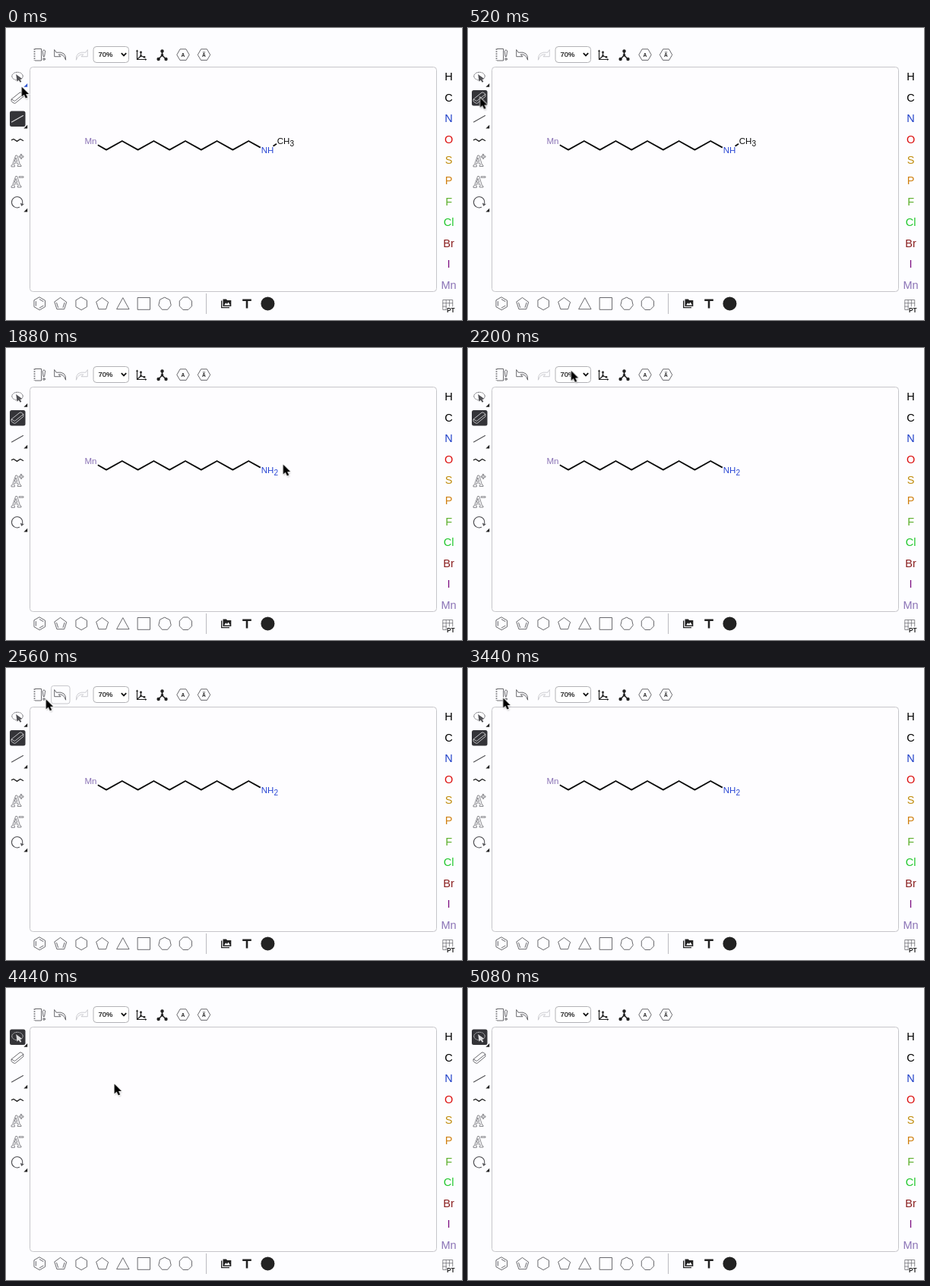
These frames come from a looping animation (600 px wide and 385 px high, 5520 ms). An HTML page:

```html
<!DOCTYPE html>
<html lang="en">
<head>
<meta charset="utf-8">
<title>Molecule editor</title>
<style>
html, body { margin: 0; width: 100%; height: 100%; overflow: hidden; background: #fdfdff; }
svg { display: block; width: 100vw; height: 100vh; font-family: "Liberation Sans", Arial, sans-serif; }
.line { fill: none; stroke: currentColor; stroke-width: .85; stroke-linejoin: round; stroke-linecap: round; }
.icons { color: #505054; }
.faint { color: #77777b; }
.solid { fill: #222; }
.on { color: #dcdcde; }
.on rect { fill: #343438; }
.hover { fill: none; stroke: #c8c8cc; }
.atom { font-size: 11.5px; }
.sub { font-size: 10px; }

.on, .hover, #mol, #methyl, #amine, #blue { animation: 5520ms step-end infinite; }
#mol { animation-name: mol; }
#methyl { animation-name: methyl; }
#amine { animation-name: amine; }
#bondOn { animation-name: bondOn; }
#eraserOn { animation-name: eraserOn; }
#lassoOn { animation-name: lassoOn; }
#eraserHover { animation-name: eraserHover; }
#undoHover { animation-name: undoHover; }
#clearHover { animation-name: clearHover; }
#blue { animation-name: blue; }
#cursor { animation: move 5520ms ease-in-out infinite, gone 5520ms step-end infinite; }

@keyframes mol { 0% { visibility: visible } 64.49%, 100% { visibility: hidden } }
@keyframes methyl { 0% { visibility: inherit } 23.91%, 100% { visibility: hidden } }
@keyframes amine { 0% { visibility: hidden } 23.91%, 100% { visibility: inherit } }
@keyframes bondOn { 0% { visibility: visible } 7.25%, 100% { visibility: hidden } }
@keyframes eraserOn { 0% { visibility: hidden } 7.25% { visibility: visible } 64.49%, 100% { visibility: hidden } }
@keyframes lassoOn { 0% { visibility: hidden } 64.49%, 100% { visibility: visible } }
@keyframes eraserHover { 0% { visibility: hidden } 4.35% { visibility: visible } 7.25%, 100% { visibility: hidden } }
@keyframes undoHover { 0% { visibility: hidden } 44.2% { visibility: visible } 47.1%, 100% { visibility: hidden } }
@keyframes clearHover {
  0% { visibility: hidden } 47.1% { visibility: visible }
  62.32% { visibility: hidden } 64.49% { visibility: visible }
  76.81%, 100% { visibility: hidden }
}
@keyframes blue { 0% { fill: #2f55d0 } 4.35%, 100% { fill: #222 } }
@keyframes gone { 0% { visibility: visible } 86.23%, 100% { visibility: hidden } }
@keyframes move {
  0%, 2.17% { transform: translate(20.7px, 77.5px) }
  6.52% { transform: translate(15px, 90px) }
  10.14% { transform: translate(16px, 92px) }
  15.94%, 23.91% { transform: translate(371.7px, 151.5px) }
  31.88%, 34.78% { transform: translate(364.7px, 153.5px) }
  42.03% { transform: translate(84px, 2px) }
  44.2% { transform: translate(71px, 24px); animation-timing-function: linear }
  46.38% { transform: translate(52.7px, 41.3px); animation-timing-function: ease-out }
  49.28%, 75.36% { transform: translate(46.2px, 39.5px) }
  80.43% { transform: translate(142.5px, 126.3px); animation-timing-function: ease-out }
  84.78%, 100% { transform: translate(152px, 134px) }
}
</style>
</head>
<body>
<svg viewBox="0 0 600 385">
  <defs>
    <filter id="soft" x="-50%" y="-50%" width="200%" height="200%"><feGaussianBlur stdDeviation="1"/></filter>
    <path id="arrow" d="M0 0V15L3.5 11.8L6 17.4L8.7 16.2L6.3 10.8H10.9Z"/>
  </defs>

  <rect x="31.5" y="51.5" width="535" height="296" rx="4" fill="#fefdff" stroke="#c6c6ca"/>

  <!-- top bar -->
  <g class="icons line">
    <path d="M38.5 27.5H46.5V43H38.5"/>
    <path d="M37.5 27.5V43" stroke-width="1.8" stroke-dasharray="1.2 1.8" stroke-linecap="butt"/>
    <path d="M48.4 30Q50 27.6 51.6 30L50.6 37.5H49.4Z"/>
    <circle cx="50" cy="41" r="1.3"/>
    <path id="back" d="M63.7 29V37.7H72L69.2 35Q75.5 33.4 78.6 42.2Q79.6 30.4 66.6 32.2Z"/>
    <use href="#back" transform="matrix(-1 0 0 1 171 0)" color="#c6c6ca"/>
  </g>
  <rect x="115" y="24.5" width="46.5" height="21" rx="4" fill="#fff" stroke="#b2b2b6"/>
  <text x="121.5" y="38.3" font-size="9.4" fill="#111" stroke="#111" stroke-width=".2">70%</text>
  <path d="M151.8 33.2L155 36.4L158.2 33.2" fill="none" stroke="#111" stroke-width="1.8"/>

  <g fill="none" stroke="#222" stroke-width="1.2">
    <path d="M172.5 29.5V41.5H184.5M173 41L177.5 36.8L182 38.5M177.5 36.8V32"/>
    <path d="M205.5 31V36L200.5 41M205.5 36L210.5 41" stroke-width="1.6"/>
  </g>
  <g class="solid">
    <path d="M171 31L172.5 28.6L174 31ZM183.2 40L185.3 41.5L183.2 43Z"/>
    <circle cx="177.5" cy="32" r="1.4"/><circle cx="177.5" cy="36.8" r="1.4"/><circle cx="182" cy="38.3" r="1.4"/>
    <circle cx="205.5" cy="30.5" r="2.2"/><circle cx="205.5" cy="35.8" r="1.8"/>
    <circle cx="200.6" cy="41" r="2.2"/><circle cx="210.5" cy="41" r="2.2"/>
    <g font-size="6.6" font-weight="700" text-anchor="middle">
      <text x="233" y="37.7">A</text><text x="260.5" y="38.2">A</text>
    </g>
    <path d="M258.8 31.6H262.2V32.3H258.8Z"/>
  </g>

  <!-- left tools -->
  <g class="icons">
    <g id="lasso">
      <ellipse class="line" cx="15" cy="63.5" rx="7.2" ry="5.2" stroke-dasharray=".9 1.4"/>
      <use href="#arrow" transform="translate(13.2 61) rotate(-8) scale(.66)" fill="currentColor"/>
    </g>
    <path id="eraser" class="line" d="M7.3 93.8L18 85.2Q19 84.6 20.2 85.2L22.4 86.7Q23 87.3 22.8 88.3V90.4L12.4 99Q11.4 99.5 10.3 99L7.6 97.2Q7 96.7 7 95.8ZM7.3 93.8L10.5 96Q11.5 96.4 12.4 95.7L22.7 87.4"/>
    <path id="bond" class="line" d="M7.5 124L22.5 115.5" style="stroke-width:1.1"/>
    <path d="M7 147.8L10 146.4L14.5 149.4L18.8 146.4L23 148.8" fill="none" stroke="#222" stroke-width="1.3"/>
    <g class="line faint">
      <g id="big"><path d="M7 182.5V181L8.3 180.6L12.7 168H14.6L18.6 180.6L20 181V182.5H15.2V181L16.3 180.6L15.5 178H11L10.2 180.6L11.4 181V182.5ZM11.6 176H14.8L13.3 171.3Z"/></g>
      <use href="#big" y="27.5"/>
      <path d="M19.4 166.5H20.8V168.9H23V170.3H20.8V172.5H19.4V170.3H17V168.9H19.4Z"/>
      <path d="M17.5 195.8H23V197.2H17.5Z"/>
    </g>
    <path class="line" d="M17.5 236.3A7.2 7.2 0 1 1 20.8 233.4M23 232.2L20.6 234.2L19.6 231.3" style="stroke-width:1.1"/>
  </g>

  <g id="lassoOn" class="on"><rect x="5" y="54.5" width="20.5" height="20.5" rx="2.5"/><use href="#lasso"/></g>
  <g id="eraserOn" class="on"><rect x="5" y="82" width="20.5" height="20.5" rx="2.5"/><use href="#eraser"/></g>
  <g id="bondOn" class="on"><rect x="5" y="109.5" width="20.5" height="20.5" rx="2.5"/><use href="#bond"/></g>
  <path id="blue" d="M28.2 73V77.8H23.4Z"/>
  <path class="solid" d="M28.2 127.8V132.6H23.4ZM28.2 237.8V242.6H23.4Z"/>

  <rect id="eraserHover" class="hover" x="4.5" y="81.5" width="21.5" height="22" rx="3"/>
  <rect id="clearHover" class="hover" x="32" y="23.5" width="24.5" height="23.5" rx="3"/>
  <rect id="undoHover" class="hover" x="59.5" y="23.5" width="24.5" height="23.5" rx="3"/>

  <!-- bottom bar -->
  <g id="rings" class="icons line"></g>
  <path d="M263.5 350V377" stroke="#bcbcc0"/>
  <g class="solid">
    <path d="M283 359.5H284.3V368H294V369.3H283ZM285.5 357.5H290L291 359H296.3V367H285.5Z"/>
    <path d="M287 365.5L289.3 362.3L290.8 364L292.6 361.5L295 365.5Z" fill="#fff"/>
    <path d="M311.2 357.5H322.8V360H318.3V369.6H315.7V360H311.2Z"/>
    <circle cx="344.4" cy="363.4" r="9"/>
  </g>

  <!-- element palette -->
  <g id="palette" font-size="14.5" text-anchor="middle"></g>
  <path class="line faint" d="M579 371.5H574.8V358.5H587.7V367M574.8 362.8H587.7M574.8 367.1H579.5M579.1 358.5V371.5M583.4 358.5V367"/>
  <text x="580" y="375.2" font-size="8.2" font-weight="700" fill="#222">PT</text>

  <!-- molecule -->
  <g id="mol">
    <path id="chain" fill="none" stroke="#0c0c0c" stroke-width="1.8" stroke-linejoin="round"/>
    <text class="atom" x="103.5" y="153" fill="#8a72b5">Mn</text>
    <text class="atom" x="335.8" y="165" fill="#2946d4">NH</text>
    <text id="amine" class="sub" x="352.6" y="167.5" fill="#2946d4">2</text>
    <g id="methyl">
      <path d="M351.5 155.7L356 152.8" stroke="#0c0c0c" stroke-width="1.8"/>
      <text class="atom" x="356.7" y="153.3" fill="#0c0c0c">CH</text>
      <text class="sub" x="373.6" y="155.6" fill="#0c0c0c">3</text>
    </g>
  </g>

  <g id="cursor">
    <g transform="scale(.87)">
      <use href="#arrow" x="1" y="2" fill="#000" opacity=".3" filter="url(#soft)"/>
      <use href="#arrow" fill="#000" stroke="#fff" stroke-width="1.8" paint-order="stroke"/>
    </g>
  </g>
</svg>
<script>
const $ = id => document.getElementById(id);
function add(parent, tag, attrs, text = "") {
  const el = document.createElementNS("http://www.w3.org/2000/svg", tag);
  for (const k in attrs) el.setAttribute(k, attrs[k]);
  el.textContent = text;
  parent.append(el);
}
function corners(n, x, y, r, turn = 0) {
  return Array.from({ length: n }, (_, i) => {
    const a = (i + turn) / n * 2 * Math.PI - Math.PI / 2;
    return [x + r * Math.cos(a), y + r * Math.sin(a)];
  });
}
const rings = $("rings");
const ring = (...args) => add(rings, "polygon", { points: corners(...args).join(" ") });
// Inner lines of double bonds, one per listed edge
function doubles(edges, n, x, y, r) {
  const p = corners(n, x, y, r);
  for (const i of edges) add(rings, "path", { d: `M${p[i]}L${p[(i + 1) % n]}` });
}

ring(6, 233, 35.3, 8.2, .5);
ring(6, 260.5, 35.3, 8.2, .5);
ring(6, 44.2, 363.4, 8.4);
doubles([0, 2, 4], 6, 44.2, 363.4, 5.6);
ring(5, 71.8, 364, 8.3);
doubles([1, 3], 5, 71.8, 364, 5.5);
ring(6, 99.2, 363.4, 8.4);
ring(5, 126.7, 364, 8.3);
add(rings, "path", { d: "M154 356L162 370.7H146ZM173.5 355.5H189.5V371.3H173.5Z" });
ring(7, 209, 363.7, 8.4);
ring(8, 236.4, 363.4, 8.8, .5);

const atoms = {
  H: "#000", C: "#000", N: "#2040c8", O: "#dc0c0c", S: "#c08c0c", P: "#d08010",
  F: "#5cb02c", Cl: "#20c82c", Br: "#8a1f1f", I: "#7d1082", Mn: "#8a72b5"
};
Object.entries(atoms).forEach(([name, fill], i) =>
  add($("palette"), "text", { x: 582.6, y: 69.2 + i * 27.45, fill }, name));

let d = "M120.8 154.2";
for (let i = 0; i < 10; i++) d += `L${132 + i * 20.8} ${i % 2 ? 149 : 160.6}`;
$("chain").setAttribute("d", d + "L334.8 157.6");
</script>
</body>
</html>
```
